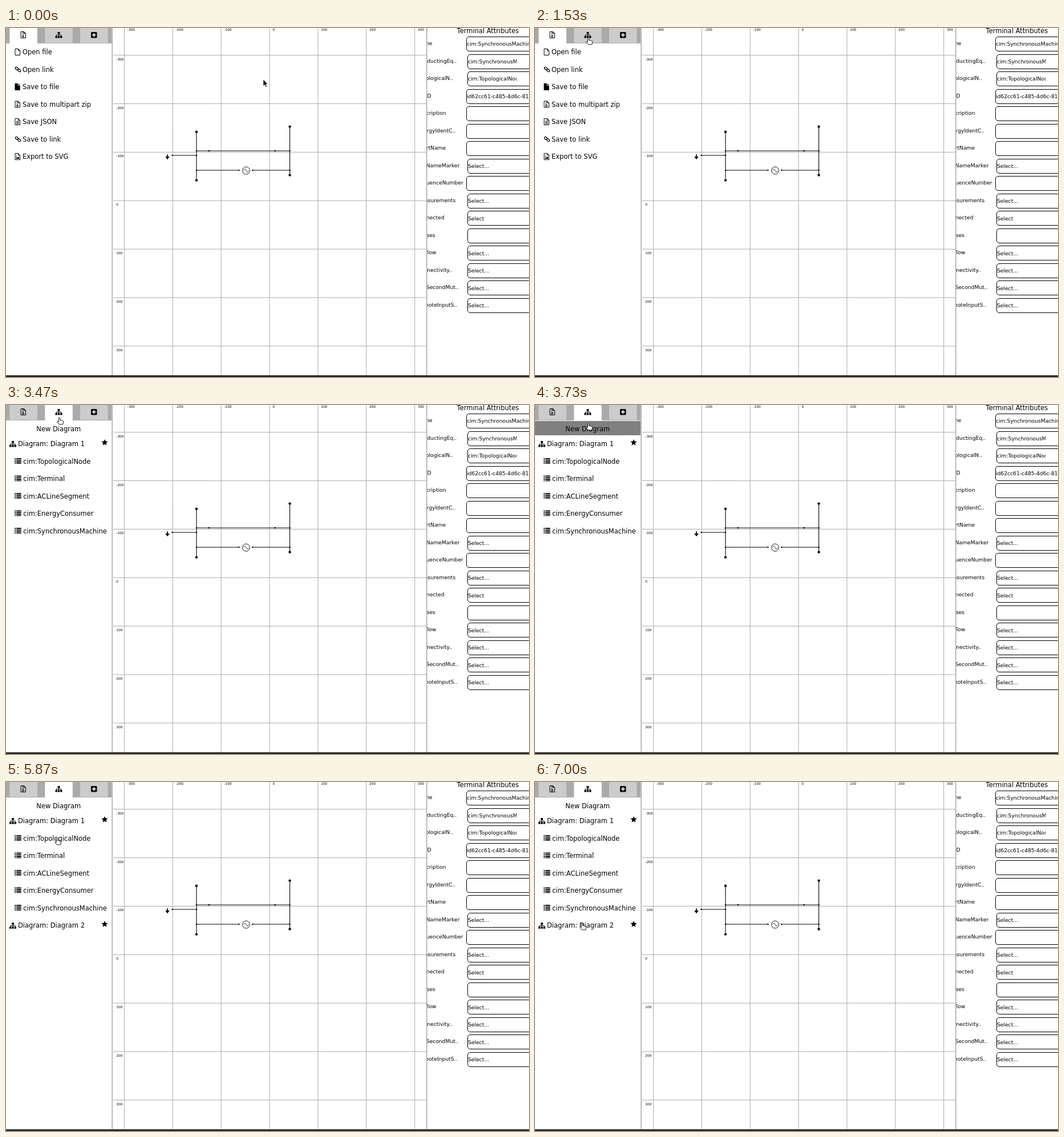
Recreate the animation shown at these times as an HTML page with a canvas. Size 917 by 611 pixels, loop 8000 ms.

```html
<!DOCTYPE html>
<html lang="en">
<head>
<meta charset="utf-8">
<title>Diagram editor</title>
<style>
html, body { margin: 0; width: 100%; height: 100%; overflow: hidden; background: #fff; }
canvas { display: block; }
</style>
</head>
<body>
<canvas id="stage" width="917" height="611"></canvas>
<script>
const ctx = document.getElementById('stage').getContext('2d');
const LOOP = 8000, FPS = 15;
const MENU = 11.48, SMALL = 9.2, TINY = 5.8;
const ROW = 30.52, CELL = 84.86;
const GREY = '#aaa', TAB = '#ccc';

const SHAPES = {
  file: 'M.5.5H6L9 3.5V11.5H.5ZM6 .5V3.5H9',
  zip: 'M3 1.5H4.4M4 3H5.4M3 4.5H4.4M4 6H5.4M3.2 7.4H5.8V9.8H3.2Z',
  lines: 'M2.3 5.5H7.2M2.3 7.5H7.2M2.3 9.5H7.2',
  picture: 'M2 10V8.6L3.4 7.2 4.4 8.2 6.3 6 7.6 7.6V10ZM2.2 4.6H3.8V6.2H2.2Z',
  solid: 'M0 0H5.3V4H9.2V12H0ZM6.2 0L9.2 3.1H6.2Z',
  tree: 'M4 0H8V3.6H4ZM0 7H3.4V10.6H0ZM4.3 7H7.7V10.6H4.3ZM8.6 7H12V10.6H8.6Z',
  branches: 'M6 3.5V7M1.7 7V5.3H10.3V7',
  list: 'M0 0H2V1.8H0ZM3 0H11.5V1.8H3ZM0 2.8H2V4.6H0ZM3 2.8H11.5V4.6H3ZM0 5.6H2V7.4H0ZM3 5.6H11.5V7.4H3ZM0 8.3H2V9.8H0ZM3 8.3H11.5V9.8H3Z',
  star: 'M0-5.6L1.6-2 5.6-1.6 2.6 1 3.5 5 0 2.9-3.5 5-2.6 1-5.6-1.6-1.6-2Z',
  arrow: 'M0 0V11.6L2.6 9.2 4.4 13.4 6.3 12.6 4.6 8.6H8.2Z',
  hand: 'M-1.1 1.2Q0-.6 1.2 1.2V5.2Q2.6 4.4 3.4 5.7 5 5 5.6 6.5 7.2 6.2 7.2 8L6.3 12.6H-.3L-3.9 8.3Q-3.7 6.6-2.2 7.4L-1.1 8.4Z'
};
for (const k in SHAPES) SHAPES[k] = new Path2D(SHAPES[k]);

// [step, x, y] of the pointer tip, at 15 steps per second
const PATH = [
  [0, 451, 90], [1, 420, 104], [2, 370, 119], [3, 320, 122], [4, 280, 106], [5, 251, 88], [10, 251, 88],
  [11, 231, 82], [12, 204, 73], [13, 182, 66], [15, 150, 49], [18, 112, 28], [21, 97, 18], [23, 93, 16],
  [50, 93, 16], [52, 93, 21], [54, 93, 27], [56, 93, 31],
  [86, 93, 31], [87, 92, 62], [88, 89, 97], [90, 86, 150], [93, 84, 204], [96, 83, 232], [99, 82, 241],
  [100, 81, 240], [102, 80, 244], [103, 80, 248], [105, 82, 246], [120, 82, 246]
];

const FILE_MENU = [
  ['file', 'Open file'], ['link', 'Open link'], ['solid', 'Save to file'],
  ['zip', 'Save to multipart zip'], ['lines', 'Save JSON'],
  ['link', 'Save to link'], ['picture', 'Export to SVG']
];
const CLASSES = ['TopologicalNode', 'Terminal', 'ACLineSegment', 'EnergyConsumer', 'SynchronousMachine'];

// [label, field text, is a select]
const FIELDS = [
  ['Name', 'cim:SynchronousMachine', 0],
  ['ConductingEq..', 'cim:SynchronousMachine', 1],
  ['TopologicalN..', 'cim:TopologicalNode', 1],
  ['mRID', 'id62cc61-c485-4d6c-81', 0],
  ['description', '', 0],
  ['energyIdentC..', '', 0],
  ['shortName', '', 0],
  ['useNameMarker', 'Select...', 1],
  ['sequenceNumber', '', 0],
  ['Measurements', 'Select...', 1],
  ['connected', 'Select', 1],
  ['phases', '', 1],
  ['outflow', 'Select...', 1],
  ['Connectivity..', 'Select...', 1],
  ['hasSecondMut..', 'Select...', 1],
  ['RemoteInputS..', 'Select...', 1]
];

function text(s, x, y, size, align = 'left') {
  ctx.font = size + 'px "DejaVu Sans", sans-serif';
  ctx.textAlign = align;
  ctx.fillStyle = '#000';
  ctx.fillText(s, x, y);
}

function rect(x, y, w, h, color) {
  ctx.fillStyle = color;
  ctx.fillRect(x, y, w, h);
}

function line(x1, y1, x2, y2, color = '#000', width = 1) {
  ctx.strokeStyle = color;
  ctx.lineWidth = width;
  ctx.beginPath();
  ctx.moveTo(x1, y1);
  ctx.lineTo(x2, y2);
  ctx.stroke();
}

function dot(x, y, r) {
  ctx.fillStyle = '#000';
  ctx.beginPath();
  ctx.arc(x, y, r, 0, 7);
  ctx.fill();
}

function clipped(x, y, w, h, draw) {
  ctx.save();
  ctx.beginPath();
  ctx.rect(x, y, w, h);
  ctx.clip();
  draw();
  ctx.restore();
}

function shape(name, x, y, fill, stroke, width = 1) {
  ctx.save();
  ctx.translate(x, y);
  ctx.lineWidth = width;
  ctx.lineJoin = 'round';
  if (fill) { ctx.fillStyle = fill; ctx.fill(SHAPES[name], 'evenodd'); }
  if (stroke) { ctx.strokeStyle = stroke; ctx.stroke(SHAPES[name]); }
  ctx.restore();
}

function link(x, y) {
  ctx.strokeStyle = '#000';
  ctx.lineWidth = 1.3;
  for (const s of [-1, 1]) {
    ctx.beginPath();
    ctx.ellipse(x + 2.1 * s, y + 1.7 * s, 2.8, 2, 0.7, 0, 7);
    ctx.stroke();
  }
}

function icon(name, x, y) {
  if (name === 'link') return link(x + 5.5, y + 6);
  if (name === 'solid') return shape('solid', x, y, '#000');
  shape('file', x, y, null, '#000');
  if (name === 'picture') shape('picture', x, y, '#000');
  else if (name !== 'file') shape(name, x, y, null, '#000');
}

function tree(x, y) {
  shape('tree', x, y, '#000');
  shape('branches', x, y, null, '#000');
}

function tabs(active) {
  rect(0, 0, 185, 27, GREY);
  for (let i = 0; i < 3; i++) {
    const on = i === active;
    rect(6.5 + 61.8 * i, 0, 48.5, on ? 27 : 26, on ? '#fff' : TAB);
  }
  icon('zip', 25.5, 6);
  tree(86.5, 7);
  ctx.fillStyle = '#000';
  ctx.beginPath();
  ctx.roundRect(149, 7, 10.5, 10.5, 1.5);
  ctx.fill();
  line(151, 12.2, 157.6, 12.2, '#fff', 1.7);
  line(154.3, 9, 154.3, 15.5, '#fff', 1.7);
}

function fileMenu() {
  FILE_MENU.forEach(([name, label], i) => {
    const y = 41.5 + ROW * i;
    icon(name, 15.5, y - 5.5);
    text(label, 29, y + 4.5, MENU);
  });
}

function diagramRow(n, y) {
  tree(6, y - 4.5);
  text('Diagram: Diagram ' + n, 21, y + 4.5, MENU);
  shape('star', 173, y - 2, '#000');
}

function diagramMenu(hover, second) {
  if (hover) rect(0, 28, 185, 25, '#808080');
  text('New Diagram', 92.3, 46, MENU, 'center');
  diagramRow(1, 67.5);
  CLASSES.forEach((name, i) => {
    const y = 98 + ROW * i;
    shape('list', 15.2, y - 5, '#000');
    text('cim:' + name, 30.3, y + 4.5, MENU);
  });
  if (second) diagramRow(2, 250.7);
}

function grid() {
  for (let i = 0; i < 7; i++) {
    const x = 207.5 + CELL * i, y = 47.7 + CELL * i;
    line(x, 0, x, 608, GREY);
    line(188, y, 737, y, GREY);
    const label = String(i * 100 - 300);
    text(label, x + 5.3, 5.2, TINY);
    text(label, 193.3, y + 9, TINY);
  }
}

function network() {
  const buses = [[334, 181.7, 266.6], [497.6, 172.6, 257.5]];
  for (const [x, top, bottom] of buses) {
    line(x, top, x, bottom, '#000', 1.1);
    dot(x, top, 2.2);
    dot(x, bottom, 2.2);
  }
  const wires = [[334, 497.6, 215.1], [334, 408.5, 249], [432.3, 497.6, 249], [291.5, 334, 223]];
  for (const [x1, x2, y] of wires) {
    line(x1, y, x2, y);
    dot(x1, y, 1.2);
    dot(x2, y, 1.2);
  }
  dot(356, 215.1, 1.4);
  dot(471.8, 215.1, 1.4);

  ctx.strokeStyle = '#000';
  ctx.lineWidth = 0.9;
  ctx.beginPath();
  ctx.arc(421, 249.6, 6.5, 0, 7);
  ctx.stroke();
  ctx.beginPath();
  for (let x = -4.2; x <= 4.2; x += 0.3) ctx.lineTo(421 + x, 249.6 - 2.8 * Math.sin((x + 4.2) * Math.PI / 4.2));
  ctx.stroke();

  line(283, 221.3, 283, 226, '#000', 1.7);
  ctx.fillStyle = '#000';
  ctx.beginPath();
  ctx.moveTo(279.3, 225);
  ctx.lineTo(286.7, 225);
  ctx.lineTo(283, 230.3);
  ctx.fill();
}

function attributes() {
  text('Terminal Attributes', 790.6, 9, MENU);
  FIELDS.forEach(([label, value, select], i) => {
    const y = 28 + ROW * i, x = select ? 809.5 : 807.5;
    text(label, 720.4, y + 2.2, SMALL);
    ctx.strokeStyle = '#000';
    ctx.lineWidth = 1;
    ctx.beginPath();
    ctx.roundRect(x, Math.floor(y - 12.5) + 0.5, 140, 25, 4.5);
    ctx.stroke();
    clipped(x, y - 12, select ? 86 : 110, 25, () => text(value, x + 0.4, y + 3.3, SMALL));
  });
}

function pointer(step) {
  let i = 1;
  while (i < PATH.length - 1 && PATH[i][0] < step) i++;
  const [s0, x0, y0] = PATH[i - 1], [s1, x1, y1] = PATH[i];
  const k = (step - s0) / (s1 - s0);
  return [x0 + (x1 - x0) * k, y0 + (y1 - y0) * k];
}

function draw(ms) {
  const step = Math.floor((ms + 5) * FPS / 1000);
  const [px, py] = pointer(step);
  const diagrams = step >= 37;

  rect(0, 0, 917, 611, '#fff');
  grid();
  network();
  tabs(diagrams ? 1 : 0);
  if (diagrams) diagramMenu(py >= 28 && py < 53, step >= 75);
  else fileMenu();
  clipped(738, 0, 179, 608, attributes);
  line(186.2, 0, 186.2, 608, GREY, 1.6);
  line(737.7, 0, 737.7, 608, GREY, 1.6);
  rect(0, 608, 917, 3, '#2a2a2c');

  if (px < 186) shape('hand', px + 0.5, py + 0.3, '#fff', '#000', 0.9);
  else shape('arrow', px, py, '#000', '#fff', 0.7);
}

function tick() {
  draw(performance.now() % LOOP);
  requestAnimationFrame(tick);
}
tick();
</script>
</body>
</html>
```
